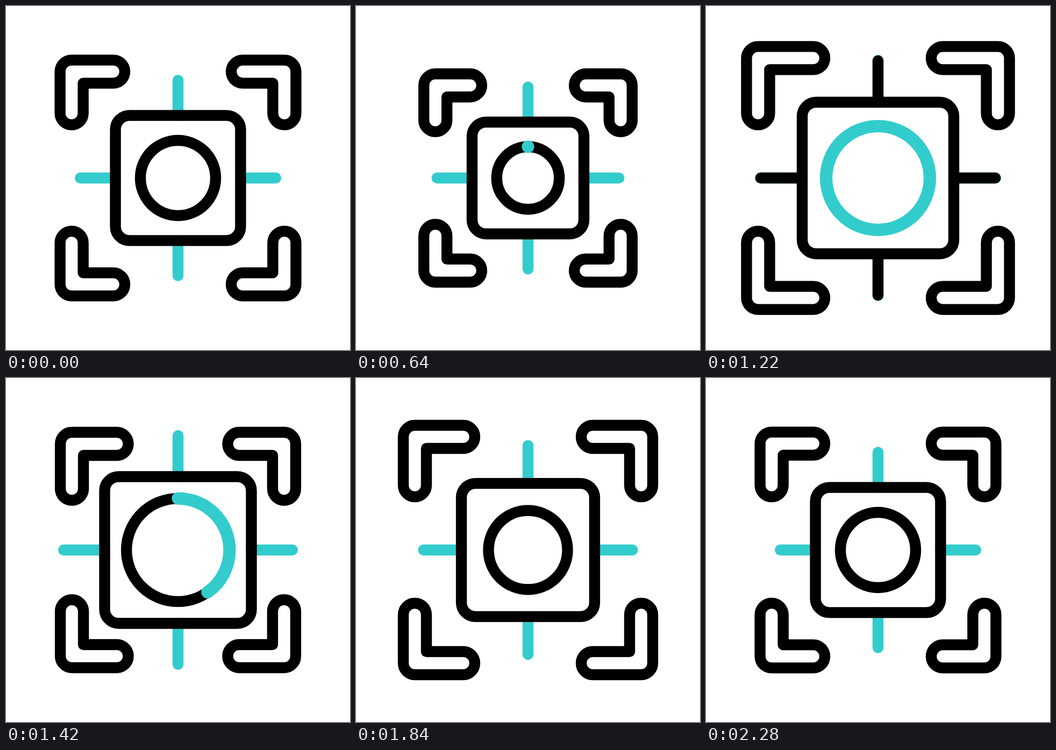
Recreate the animation shown at these times as an HTML page. Size 640 by 640 pixels, loop 2.44 s.

```html
<!DOCTYPE html>
<html lang="en">
<head>
<meta charset="utf-8">
<title>Focus target</title>
<style>
  html, body { margin: 0; width: 100%; height: 100%; overflow: hidden; background: #fff; }
  svg { display: block; width: 100vw; height: 100vh; }
</style>
</head>
<body>
<svg viewBox="-320 -320 640 640" fill="none" stroke="#000" stroke-width="20.4"
     stroke-linecap="round" stroke-linejoin="round">
  <defs><path id="corner"/></defs>
  <use href="#corner"/>
  <use href="#corner" transform="scale(-1 1)"/>
  <use href="#corner" transform="scale(1 -1)"/>
  <use href="#corner" transform="scale(-1 -1)"/>
  <path id="ticks" stroke="#33cccc"/>
  <path id="darkTicks"/>
  <rect id="box" rx="26"/>
  <circle id="ring"/>
  <circle id="sweep" stroke="#33cccc" stroke-width="23.2" transform="rotate(-90)"/>
</svg>
<script>
const LOOP = 2440;
const el = id => document.getElementById(id);
const set = (id, attrs) => {
  for (const name in attrs) el(id).setAttribute(name, attrs[name]);
};
const ease = u => {
  u = Math.min(1, Math.max(0, u));
  return u * u * (3 - 2 * u);
};

// Each value goes rest > tight > wide > tight > half wide > rest.
// lag delays every leg; wideLag delays the first widening.
function bounce(t, [rest, tight, wide], lag, wideLag) {
  const half = (rest + wide) / 2;
  const legs = [
    [200 + lag, 320, tight],
    [640 + wideLag, 390, wide],
    [1280 + lag, 280, tight],
    [1560 + lag, 280, half],
    [1840 + lag, 320, rest]
  ];
  let value = rest;
  for (const [start, length, to] of legs) {
    value += (to - value) * ease((t - start) / length);
  }
  return value;
}

function cornerPath(d, e) {
  const r = 21.5, inner = d - 2 * r, arc = `A${r} ${r} 0 0 0 `;
  return `M${e} ${d}H${d - r}${arc}${d} ${d - r}V${e}${arc}${inner} ${e}` +
    `V${inner}H${e}${arc}${e} ${d}Z`;
}

const tickPath = (from, to) =>
  `M0 ${-from}V${-to}M0 ${from}V${to}M${-from} 0H${-to}M${from} 0H${to}`;

function draw(t) {
  const outer = bounce(t, [219.4, 193.8, 244.6], 0, 0);
  const armEnd = bounce(t, [120.5, 107.6, 120.5], 0, 0);
  const half = bounce(t, [116.4, 104, 141], 80, 40);
  const tip = bounce(t, [181.8, 169.3, 218.8], 80, 40);
  const radius = bounce(t, [70, 58.2, 96.5], 120, 68);
  const drawn = ease((t - 640) / 600) - ease((t - 1240) / 320);
  const around = 2 * Math.PI * radius;

  set('corner', { d: cornerPath(outer, armEnd) });
  set('ticks', { d: tickPath(half, tip) });
  set('darkTicks', {
    d: tickPath(half, Math.max(half, tip * drawn)),
    visibility: tip * drawn > half ? 'visible' : 'hidden'
  });
  set('box', { x: -half, y: -half, width: 2 * half, height: 2 * half });
  set('ring', { r: radius });
  set('sweep', {
    r: radius,
    'stroke-dasharray': `${around * drawn} ${around * 2}`,
    visibility: drawn > 0 ? 'visible' : 'hidden'
  });
}

const began = performance.now();
function tick() {
  draw((performance.now() - began) % LOOP);
  requestAnimationFrame(tick);
}
tick();
</script>
</body>
</html>
```
